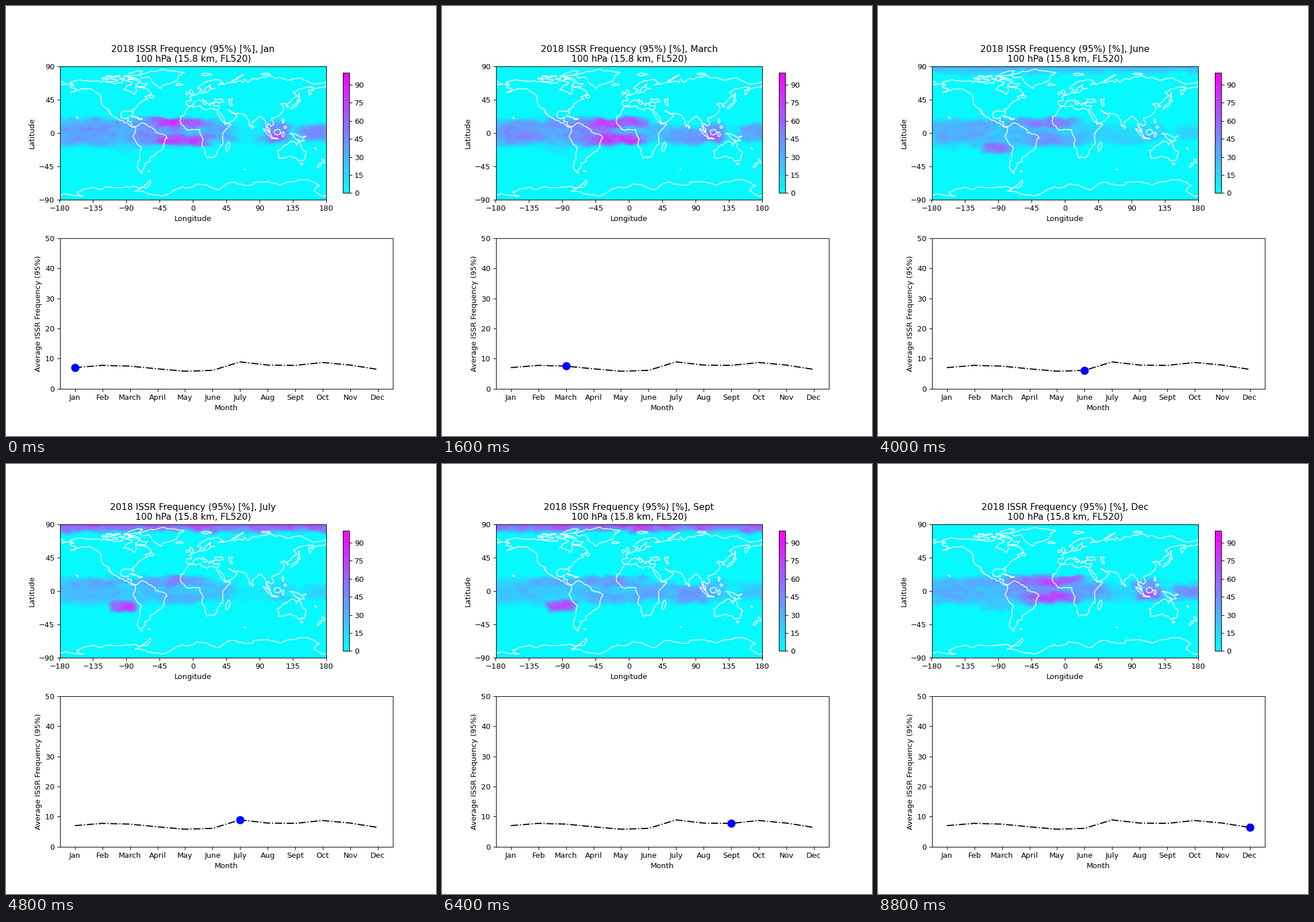
Write a matplotlib script that moves like this. It is 748x748 px and loops after 9600 ms.

```python
import numpy as np
import matplotlib.pyplot as plt
from matplotlib.animation import FuncAnimation

MONTHS = ["Jan", "Feb", "March", "April", "May", "June",
          "July", "Aug", "Sept", "Oct", "Nov", "Dec"]
AVERAGE = [7.0, 7.75, 7.5, 6.6, 5.8, 6.1, 8.9, 7.85, 7.75, 8.7, 7.85, 6.4]
LON, LAT = np.meshgrid(np.linspace(-180, 180, 361), np.linspace(-90, 90, 181))


def noise(rng, sx, sy):
    """Smooth random field with unit deviation."""
    fy = np.fft.fftfreq(LON.shape[0])[:, None]
    fx = np.fft.fftfreq(LON.shape[1])[None, :]
    blur = np.exp(-2 * np.pi**2 * ((fx * sx)**2 + (fy * sy)**2))
    out = np.fft.ifft2(np.fft.fft2(rng.normal(size=LON.shape)) * blur).real
    return out / out.std()


def frequency(month):
    """Humid regions that swell and fade with the seasons."""
    rng = np.random.default_rng(40 + month)
    lon = LON + 4 * noise(rng, 5, 3)
    lat = LAT + 1.2 * noise(rng, 5, 3)

    def region(x, y, w, h, mean, swing=0, peak=0, cycles=1):
        level = mean + swing * np.cos(2 * np.pi * cycles * (month - peak) / 12)
        return max(level, 0) * np.exp(-((lon - x) / w)**4 - ((lat - y) / h)**4)

    parts = [
        region(-140, 0, 60, 18, 33, 9, 2),            # Pacific
        region(-100, 12, 50, 6, 28),
        region(-45, 0, 52, 18, 34, 12, 1),            # South America
        region(-22, 13, 46, 7, 55, 18, 1),            # Atlantic lobes
        region(-18, -9, 42, 8, 50, 24, 1),
        region(-93, -20, 20, 8, 38, 32, 7),           # off Peru
        region(30, 0, 32, 13, 29, 8, 10),             # Africa
        region(80, -4, 30, 12, 28, 20, 3, cycles=2),  # Indian Ocean
        region(113, 0, 22, 14, 30, 18, 11.8),         # Indonesia
        region(114, -6, 12, 6, 36, 22, .5),
        region(166, 0, 24, 11, 30, 14, 0),            # western Pacific
        region(0, 92, 400, 12, -25, 102, 7),          # Arctic summer
    ]
    texture = 1 + 0.08 * noise(rng, 5, 2.5) + 0.05 * noise(rng, 2, 1.2)
    return np.clip(np.cbrt(sum(p**3 for p in parts)) * texture, 0.01, 99.9)


fig, (map_ax, line_ax) = plt.subplots(2, 1, figsize=(8, 8), dpi=93.5)
layers = [map_ax.contourf(LON, LAT, frequency(m), levels=range(0, 101, 5),
                          cmap="cool") for m in range(12)]
map_ax.set_aspect("equal")
fig.colorbar(layers[0], ax=map_ax, shrink=0.8, ticks=range(0, 91, 15))

shore_rng = np.random.default_rng(7)


def draw_shore(z, depth):
    """Roughen a complex polyline by midpoint displacement and draw it."""
    for _ in range(depth):
        step = np.diff(z)
        mid = z[:-1] + step * (0.5 + 0.1j * shore_rng.normal(size=step.size))
        z = np.append(np.column_stack([z[:-1], mid]).ravel(), z[-1])
    map_ax.plot(z.real, z.imag, color="white", lw=1.1)


def coast(*lonlat):
    draw_shore(np.array(lonlat[::2]) + 1j * np.array(lonlat[1::2]), 3)


def island(lon, lat, w, h, tilt=0):
    a = np.linspace(0, 2 * np.pi, 9)
    ring = (w * np.cos(a) + 1j * h * np.sin(a)) * np.exp(1j * np.radians(tilt))
    draw_shore(lon + 1j * lat + ring, 1)


# Americas and Greenland
coast(-141, 69.7, -156, 71.3, -166, 68.4, -162, 66.2, -168, 65.6, -161, 64.4,
      -166, 61.6, -157, 58.8, -165, 54.6, -151, 60, -140, 59.8, -131, 55,
      -124, 48.5, -124, 40, -117, 33, -109.5, 23, -114.5, 31.5, -105.5, 21,
      -95, 16, -87.5, 13, -83, 8.3, -78, 8.3)
coast(-78, 8.3, -77.4, 4, -81, -4, -76, -14, -70.3, -18.5, -71.6, -33,
      -75.5, -47, -69, -55, -69, -50.5, -66, -47.5, -65, -41, -57.5, -38,
      -58, -34, -48.6, -27, -39.5, -20, -39, -13, -35, -7, -50, 0, -52, 5,
      -61.5, 10, -72, 12, -77, 8.2)
coast(-77, 8.2, -83.5, 10.5, -83.3, 15, -88.5, 15.8, -87, 21.3, -91.5, 18.7,
      -97, 20.6, -97, 27.5, -84, 30, -80.5, 25.2, -81.3, 31, -76, 35.2, -70, 42,
      -61, 45.5, -65, 49, -56, 52.5, -64.5, 60.3, -77.7, 62.5, -76.6, 56.5,
      -79, 51.5, -82.3, 55, -94, 58.5, -87, 64.8, -81.5, 68, -94, 71.5, -96, 68,
      -115, 68.2, -128, 70.2, -141, 69.7)
coast(-66, 62, -78, 64.5, -73, 68, -89, 71, -84, 73.8, -72, 71.5, -61.5, 66.8,
      -66, 62)
coast(-73, 78.2, -59, 75.8, -53.5, 67, -44, 60, -40, 65, -22, 70, -19, 78,
      -12, 81.5, -33, 83.6, -60, 82, -73, 78.2)
# Europe and Asia
coast(-5.6, 36, -9, 38.5, -9, 43, -1.5, 43.5, -4.6, 48.4, 8.5, 54, 10, 57.5,
      11, 54, 20, 55, 23.5, 59.2, 30, 60, 21.5, 62.5, 24, 65.7, 17, 61, 15, 56,
      11, 59, 5.5, 60, 15, 68.3, 26, 71, 41, 67, 34, 65, 44, 66.5, 60, 69.5,
      68, 68.5, 69, 72.8, 73, 68, 80, 73, 104, 77.7, 110, 73.8, 129, 71,
      150, 71.5, 180, 69)
coast(-180, 69, -170, 66, -180, 65)
coast(180, 65, 179, 62.3, 163, 59.5, 157, 51, 156, 57.5, 163, 61.5, 143, 59.3,
      135, 54.7, 140.5, 50, 127.5, 39.5, 129, 35.2, 126.5, 35, 125, 39.7, 118, 39,
      121.5, 37, 121.8, 29.5, 114, 22.3, 106, 20, 109, 12, 105, 9, 101, 13, 100, 8,
      104, 1.3, 98.4, 9, 97.5, 16.5, 91, 22.5, 80, 15, 77.5, 8, 72.8, 20,
      66.5, 25.3, 57, 26, 48, 30, 56.3, 25.5, 59.8, 22.5, 52, 15.5, 43.3, 12.7,
      35, 28.5)
coast(29, 41.2, 41.5, 41.5, 38, 46.5, 33.5, 45, 30, 46, 29, 41.2)
coast(49, 41, 47.5, 45.5, 53, 46, 52, 43, 53.5, 37, 50, 37.4, 49, 41)
# Africa and the Mediterranean
coast(32.6, 29.8, 37.4, 19, 43.3, 11.5, 51, 11.8, 40, -3, 40.5, -15, 35, -21,
      32.5, -28, 26, -34, 18.5, -34, 12, -17, 13.5, -9, 9, 0, 9, 4.5, -8, 4.5,
      -17, 14, -16.5, 22, -9.7, 30, -6, 35.8, 10, 37.3, 11, 33.5, 19.5, 30.5,
      22, 32.8, 33, 31.3, 36, 36.5, 27, 37, 29, 41, 23, 40.3, 23, 36.7, 13, 45.6,
      18.4, 40, 15.7, 38.2, 9, 44.4, 3.5, 43, -2, 36.8, -5.6, 36)
# Oceania and Antarctica
coast(142.5, -10.8, 146, -19, 153, -26, 150, -37, 143.5, -38.7, 138, -33.5,
      131, -31.5, 124, -34, 115.3, -34, 113.7, -24, 122, -18, 130.6, -12.5,
      137, -12.2, 139.5, -17.4, 142.5, -10.8)
coast(131, -1, 141, -2.6, 150.5, -10.5, 138.5, -8, 131, -1)
coast(-180, -84.5, -148, -85, -157, -80, -146, -75.4, -102, -74, -68, -73,
      -58, -63.3, -62, -74, -78, -79, -60, -82.5, -28, -79.5, -15, -72.5, 18, -70,
      50, -67, 69, -71, 88, -66.5, 135, -66, 171, -71.5, 163, -78, 180, -84.5)

# Islands
island(-110, 71, 8, 2)
island(-79, 80, 11, 2.2, 15)
for x in range(-120, -80, 6):
    island(x, shore_rng.uniform(73, 77), 3.5, 0.8)
island(18, 78.7, 7, 1.5)
island(60, 74, 9, 1, 30)
island(98, 79.5, 6, 1.2)
island(-18.5, 65, 5, 1.4)
island(-2, 54.5, 1.8, 4.2, 10)
island(-8, 53.4, 2, 1.8)
island(-56, 49, 3, 2)
island(-79.5, 21.6, 5.5, 0.6, -17)
island(-71.5, 18.8, 3, 0.8)
island(-156.5, 20.5, 1.8, 0.4, -35)
island(-59.5, -51.8, 1.7, 0.5)
island(46.8, -19, 2.2, 6.8, -15)
island(69.5, -49.3, 0.8, 0.4)
island(80.8, 7.7, 0.9, 1.7)
island(137, 36.5, 6.5, 1.3, 40)
island(142.7, 43.5, 2.4, 1.4)
island(143, 50, 0.8, 4)
island(121.5, 16, 1.2, 3)
island(124.5, 7.7, 1.8, 1.6)
island(101, 0, 8, 1.4, -45)
island(110, -7.4, 4.8, 0.7, -6)
island(114, 1, 4.5, 4)
island(121.5, -2, 1.5, 3.5)
island(150.3, -5.2, 2, 0.5, 20)
island(165.5, -21.3, 1.8, 0.3, -40)
island(146.5, -42, 1.6, 1.3)
island(176, -38, 1.3, 3.4, 25)
island(170.5, -43.7, 1.4, 4.2, -40)

map_ax.set(xlim=(-180, 180), ylim=(-90, 90), xlabel="Longitude",
           ylabel="Latitude", xticks=range(-180, 181, 45),
           yticks=range(-90, 91, 45))

line_ax.plot(MONTHS, AVERAGE, "k-.")
marker, = line_ax.plot([0], AVERAGE[:1], "bo", ms=10)
line_ax.set(ylim=(0, 50), xlabel="Month", ylabel="Average ISSR Frequency (95%)")


def update(month):
    for m, layer in enumerate(layers):
        layer.set_visible(m == month)
    marker.set_data([month], [AVERAGE[month]])
    map_ax.set_title(f"2018 ISSR Frequency (95%) [%], {MONTHS[month]}\n"
                     "100 hPa (15.8 km, FL520)")


anim = FuncAnimation(fig, update, frames=12, interval=800, repeat=True)
plt.show()
```
